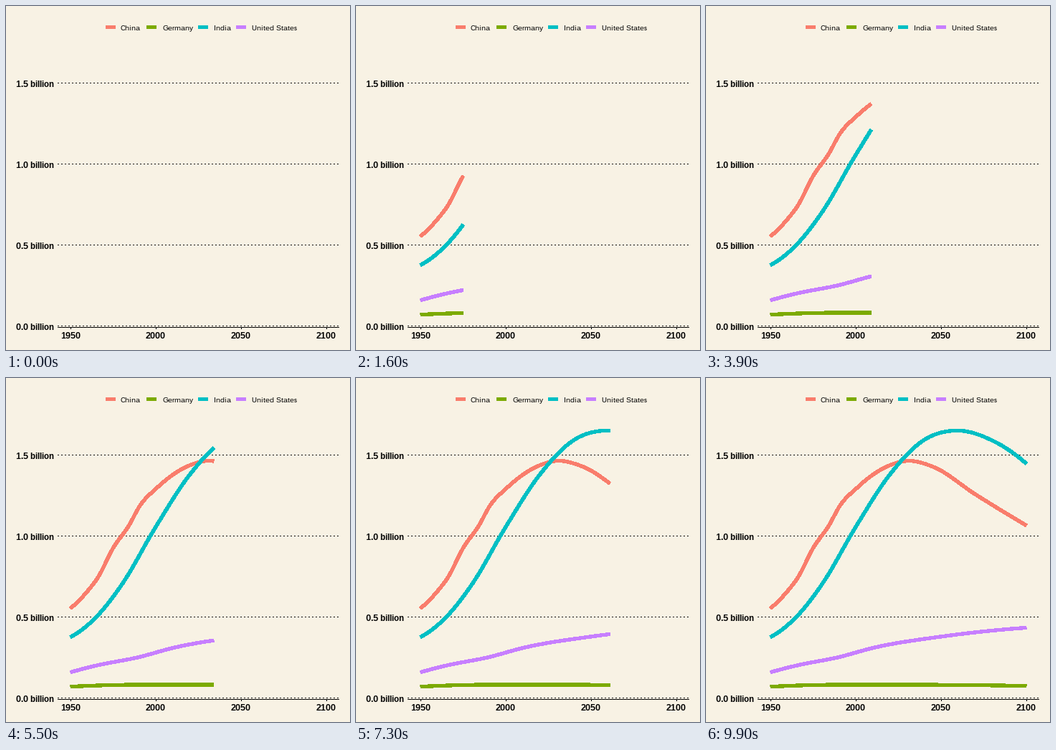
Write a matplotlib script that moves like this. It is 480 by 480 pixels and loops after 10000 ms.

```python
import matplotlib.pyplot as plt
import numpy as np
from matplotlib.animation import FuncAnimation

SIZE, DPI = 480, 72  # at 72 dpi one point is one pixel
FRAMES, INTERVAL = 100, 100
FIRST, LAST = 1950, 2100
BG = "#f8f2e4"
THICK = 4.3

plt.rcParams.update({
    "font.family": "Liberation Sans",
    "text.hinting": "native",
    "text.hinting_factor": 1,
})

# name, colour, legend key x, label x, key points (year, millions)
SERIES = [
    ("China", "#f97d6c", 139, 160,
     [(1950, 554), (1960, 660), (1966, 743), (1975, 926), (1984, 1061),
      (1991, 1192), (2000, 1291), (2018, 1428), (2030, 1464), (2045, 1429),
      (2070, 1258), (2100, 1065)]),
    ("Germany", "#7caa00", 196, 218,
     [(1950, 70), (1970, 78.6), (2015, 82), (2100, 74.7)]),
    ("India", "#00bfc4", 268, 290,
     [(1950, 376), (1965, 499), (1980, 699), (2000, 1057), (2020, 1380),
      (2040, 1593), (2058, 1651), (2080, 1590), (2100, 1447)]),
    ("United States", "#c77fff", 321, 343,
     [(1950, 159), (1965, 200), (1990, 252), (2010, 309), (2050, 379),
      (2100, 434)]),
]


def year_x(year):
    return 90 + (year - FIRST) * 2.38


def pop_y(millions):
    return 446.5 - millions * 0.226


def smooth(points, x):
    """Cubic Hermite curve through unevenly spaced points."""
    px, py = np.array(points, float).T
    slope = np.gradient(py, px, edge_order=2)
    i = np.clip(np.searchsorted(px, x, side="right") - 1, 0, len(px) - 2)
    h = px[i + 1] - px[i]
    t = (x - px[i]) / h
    return ((1 + 2 * t) * (1 - t) ** 2 * py[i]
            + t * (1 - t) ** 2 * h * slope[i]
            + t * t * (3 - 2 * t) * py[i + 1]
            + t * t * (t - 1) * h * slope[i + 1])


fig = plt.figure(figsize=(SIZE / DPI, SIZE / DPI), dpi=DPI, facecolor=BG)
ax = fig.add_axes([0, 0, 1, 1])
ax.set(xlim=(0, SIZE), ylim=(SIZE, 0))
ax.axis("off")


def stroke(xs, ys, color="black", width=1, **kw):
    return ax.plot(xs, ys, color=color, lw=width, antialiased=False,
                   snap=False, solid_capstyle="butt", dash_capstyle="butt",
                   solid_joinstyle="round", **kw)[0]


def label(x, y, text, size=12, weight="bold", ha="left"):
    ax.text(x, y, text, fontsize=size, weight=weight, ha=ha, va="baseline")


for step in range(4):
    y = pop_y(step * 500)
    stroke([72, 465], [y, y], ls=(0, (1, 3)))
    label(14, y + 5.5, f"{step / 2:.1f} billion")

stroke([72, 465], [448.5, 448.5])
for year in range(FIRST, LAST + 1, 50):
    x = round(year_x(year))
    stroke([x + 0.5, x + 0.5], [448, 451])
    label(x, 464, str(year), ha="center")

years = np.arange(FIRST, LAST + 1)
xs = year_x(years)
curves = []
for name, color, key_x, text_x, points in SERIES:
    stroke([key_x, key_x + 14], [29.5, 29.5], color, THICK)
    label(text_x, 34, name, 10, "normal")
    curves.append((stroke([], [], color, THICK), pop_y(smooth(points, years))))

# each year appears on the frame nearest to its moment
due = np.rint((years - FIRST) * (FRAMES - 1) / (LAST - FIRST))


def draw(frame):
    n = np.count_nonzero(due <= frame)
    for line, ys in curves:
        line.set_data(xs[:n], ys[:n])
    return [line for line, _ in curves]


anim = FuncAnimation(fig, draw, frames=FRAMES, interval=INTERVAL, repeat=True)
plt.show()
```
